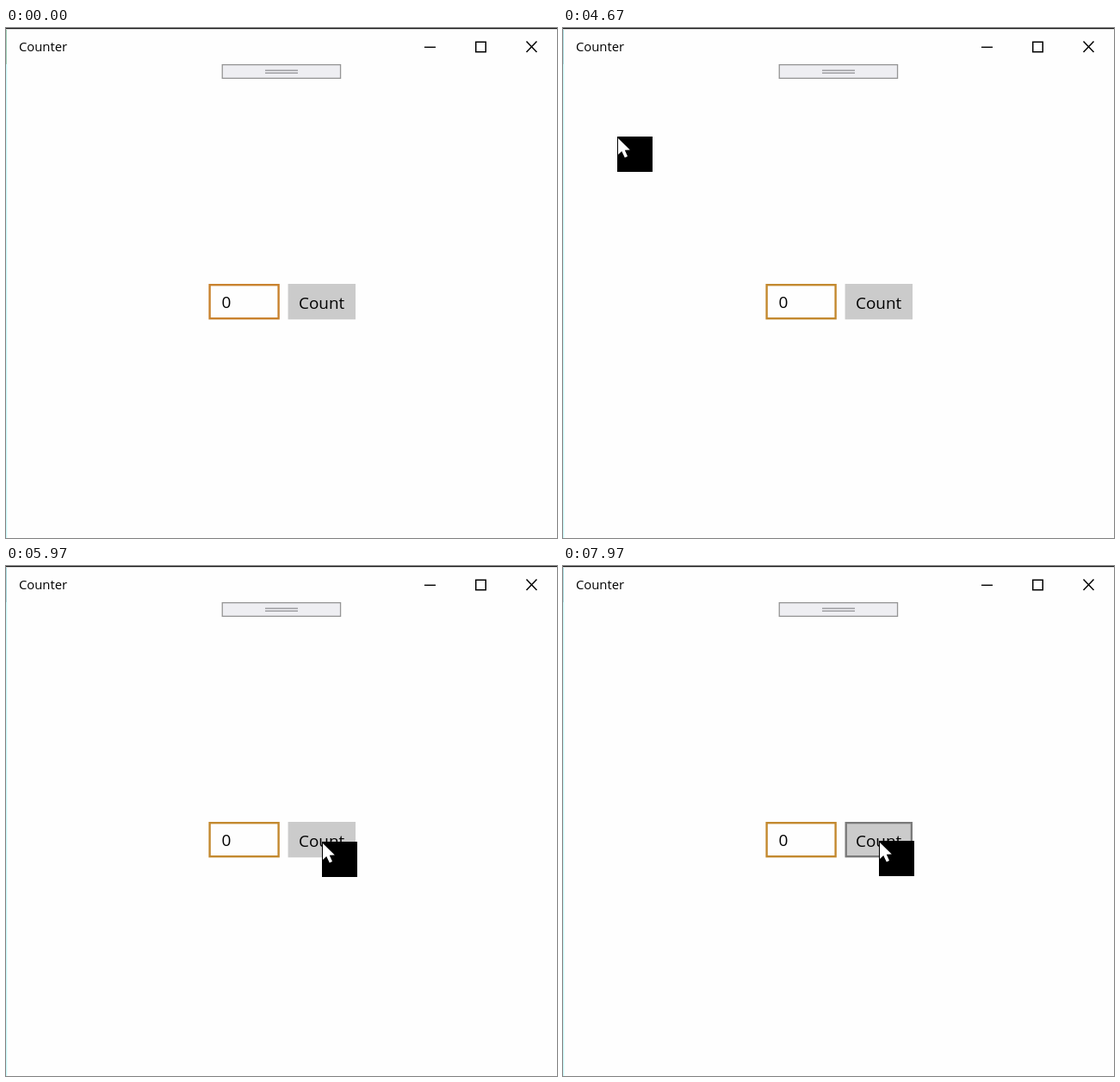
Animation, 640 px wide and 592 px high, one loop 8000 ms. Source, as an HTML page with a canvas:

```html
<!DOCTYPE html>
<html lang="en">
<head>
<meta charset="utf-8">
<title>Counter</title>
<style>
html, body { margin: 0; width: 100%; height: 100%; overflow: hidden; background: #fff; }
canvas { display: block; width: 640px; height: 592px; }
</style>
</head>
<body>
<canvas id="stage" width="640" height="592"></canvas>
<script>
const ctx = document.getElementById('stage').getContext('2d');
const LOOP = 8000;
const FONT = '"Open Sans", "Noto Sans", sans-serif';

const pt = (x, y) => ({ x, y });
const easeOut = s => 1 - (1 - s) ** 1.78;

const line = (a, b) => u => pt(a.x + (b.x - a.x) * u, a.y + (b.y - a.y) * u);

// De Casteljau on the control points.
function curve(...points) {
  return u => {
    let row = points;
    while (row.length > 1) row = row.slice(1).map((b, i) => line(row[i], b)(u));
    return row[0];
  };
}

const target = pt(367, 320), corner = pt(556, 499);
const moves = [
  { from: 4400, to: 4470, path: line(pt(25, 128), pt(62, 129)) },
  { from: 4670, to: 5410, path: curve(pt(63, 128), pt(90, -138), pt(275, 335), pt(366, 321)) },
  { from: 5510, to: 5511, path: line(target, target) },
  { from: 6470, to: 6471, path: line(corner, corner) },
  { from: 7210, to: 7770, path: line(pt(544, 492), pt(367, 319)), hover: true }
];

function pointerAt(t) {
  const move = moves.filter(m => m.from <= t).pop();
  if (!move) return null;
  const s = Math.min(1, (t - move.from) / (move.to - move.from));
  const p = move.path(easeOut(s));
  return { x: Math.round(p.x), y: Math.round(p.y), hover: move.hover };
}

function rect(x, y, w, h, color) {
  ctx.fillStyle = color;
  ctx.fillRect(x, y, w, h);
}

function frame(x, y, w, h, width, color) {
  ctx.lineWidth = width;
  ctx.strokeStyle = color;
  ctx.strokeRect(x + width / 2, y + width / 2, w - width, h - width);
}

function text(str, x, y, size) {
  ctx.font = `${size}px ${FONT}`;
  ctx.fillStyle = '#000';
  ctx.fillText(str, x, y);
}

function drawTitleBar(t) {
  rect(0, 0, 640, 592, '#fefefe');
  rect(0, 0, 1, 592, '#c8f7f8');
  rect(1, 42, 1, 550, '#effdfd');
  rect(0, 0, 1, 42, t < 400 ? '#9fd0b8' : '#a9dce0');
  rect(0, 0, 640, 1, '#171717');
  rect(0, 1, 640, 1, '#d4d4d4');
  text('Counter', 15, 27, 14.8);

  rect(486, 21.6, 13, 1.4, '#000');
  frame(545, 15.5, 13, 13, 1.5, '#000');
  ctx.beginPath();
  ctx.moveTo(604.5, 15.5);
  ctx.lineTo(616.5, 28);
  ctx.moveTo(616.5, 15.5);
  ctx.lineTo(604.5, 28);
  ctx.stroke();
}

function drawToolbar() {
  rect(251, 42, 138, 17, '#eeeef2');
  frame(250.6, 42, 138.6, 17, 1.3, '#959595');
  rect(301, 48.6, 38, 1.2, '#8c8c90');
  rect(301, 51.6, 38, 1.2, '#8c8c90');
}

function drawForm(t, p) {
  frame(235.4, 297, 82.4, 41.4, 2.4, t < 400 ? '#c9822e' : '#c3892f');
  text('0', 250.5, 324.5, 19);
  rect(327.6, 297, 78.4, 41.3, '#cbcbcb');
  const over = p && p.hover && p.x >= 328 && p.x < 406 && p.y >= 297 && p.y < 338;
  if (over) frame(327.6, 297, 78.4, 41.3, 2.3, '#7a7a7a');
  text('Count', 340, 325.5, 18.9);
}

function drawPointer({ x, y }) {
  rect(x, y, 41, 41, '#000');
  ctx.save();
  ctx.translate(x, y);
  ctx.fillStyle = '#fff';
  ctx.fill(new Path2D('M1 2V21L5.2 17L8.8 24.5L12 23L8.8 15.8L14.8 15.5Z'));
  ctx.restore();
}

function render(t) {
  const p = pointerAt(t);
  drawTitleBar(t);
  drawToolbar();
  drawForm(t, p);
  if (p) drawPointer(p);
}

const begin = performance.now();
function tick() {
  render((performance.now() - begin) % LOOP);
  requestAnimationFrame(tick);
}
tick();
</script>
</body>
</html>
```
